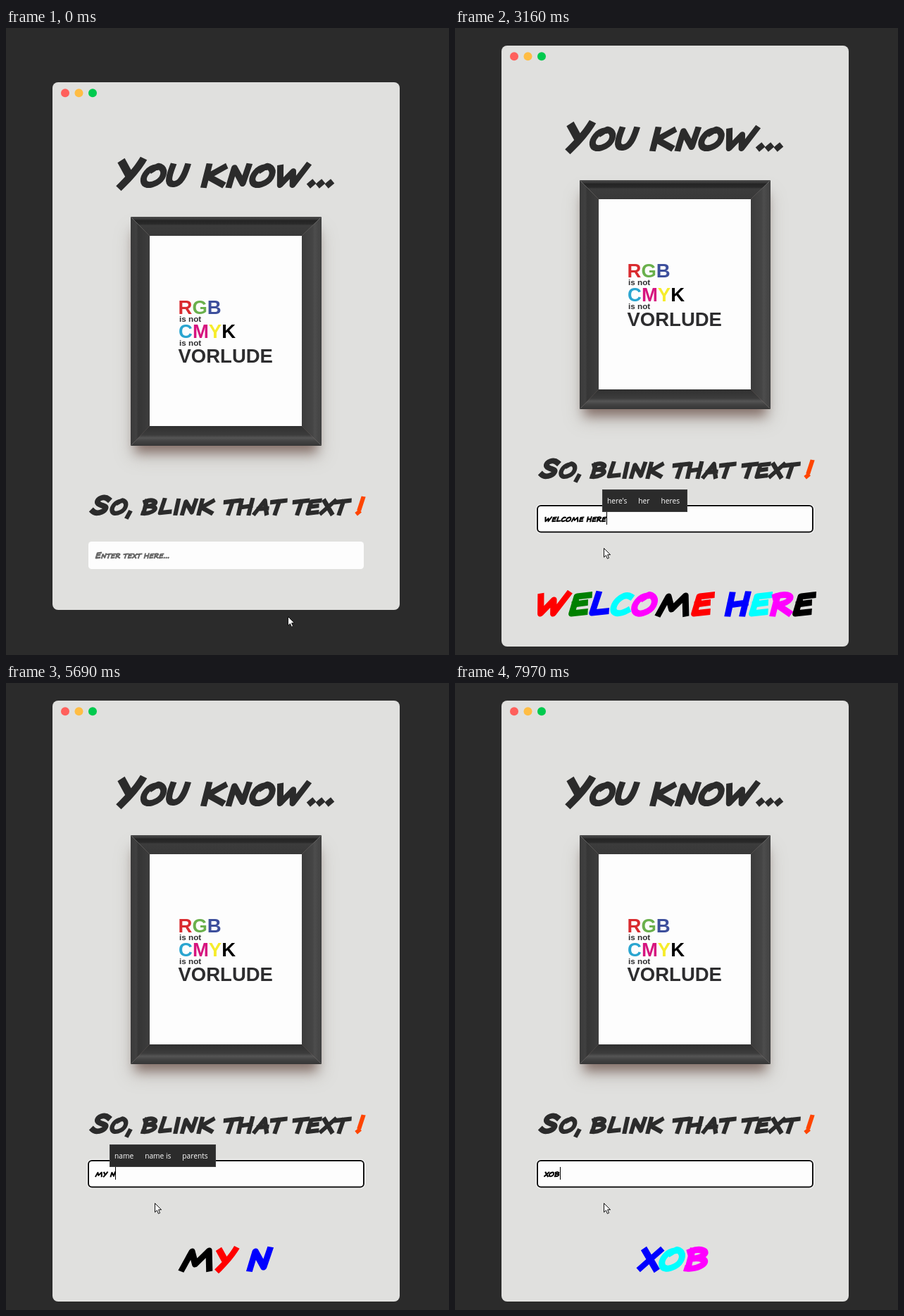
Write an HTML page that moves like this. It is 629 px wide and 890 px high and loops after 8 s.

```html
<!DOCTYPE html>
<html lang="en">
<head>
<meta charset="utf-8">
<title>Blink that text</title>
<style>
  html, body { margin: 0; width: 100%; height: 100%; overflow: hidden; background: #2b2b2b; }
  #stage { position: absolute; left: 0; top: 0; width: 629px; height: 890px; overflow: hidden; }
  svg { display: block; }
  .ink path { fill: none; stroke-width: 9; stroke-linecap: square; stroke-linejoin: round; }
  .poster { font: bold 27.5px "Liberation Sans", Arial, sans-serif; }
  .poster .small { font-size: 11.7px; fill: #2d2d2f; }
  #popup {
    position: absolute; top: 655px; height: 32px; box-sizing: border-box;
    display: none; align-items: center; gap: 16px; padding: 0 10px 0 6px;
    background: #2b2b2b; border: 1px solid #3d3d3d; color: #fff;
    font: 10.2px "Open Sans", "Noto Sans", sans-serif; white-space: nowrap;
  }
</style>
</head>
<body>
<div id="stage">
  <svg width="629" height="890" viewBox="0 0 629 890">
    <defs>
      <linearGradient id="top" x2="0" y2="1">
        <stop offset="0" stop-color="#4a4a4a"/><stop offset=".12" stop-color="#3a3a3a"/>
        <stop offset=".2" stop-color="#242424"/><stop offset=".38" stop-color="#2a2a2a"/>
        <stop offset=".45" stop-color="#3c3c3c"/><stop offset="1" stop-color="#383838"/>
      </linearGradient>
      <linearGradient id="left">
        <stop offset="0" stop-color="#3a3a3a"/><stop offset=".3" stop-color="#404040"/>
        <stop offset=".4" stop-color="#353535"/><stop offset="1" stop-color="#3d3d3d"/>
      </linearGradient>
      <linearGradient id="right">
        <stop offset="0" stop-color="#3c3c3c"/><stop offset=".55" stop-color="#454545"/>
        <stop offset=".65" stop-color="#4d4d4d"/><stop offset="1" stop-color="#404040"/>
      </linearGradient>
      <linearGradient id="bottom" x2="0" y2="1">
        <stop offset="0" stop-color="#303030"/><stop offset=".45" stop-color="#3c3c3c"/>
        <stop offset=".6" stop-color="#555"/><stop offset=".75" stop-color="#444"/>
        <stop offset="1" stop-color="#363636"/>
      </linearGradient>
    </defs>

    <g id="page">
      <rect id="window" x="66" y="25" width="493" height="749" rx="8" fill="#e0e0de"/>
      <circle cx="84" cy="40.3" r="6" fill="#ff605c"/>
      <circle cx="103.5" cy="40.3" r="6" fill="#ffbd44"/>
      <circle cx="123" cy="40.3" r="6" fill="#00ca4e"/>

      <rect x="177" y="234" width="271" height="324" fill="#6b5a50" opacity=".25" style="filter:blur(13px)"/>
      <rect x="184" y="236" width="257" height="314" fill="#6b5048" opacity=".7" style="filter:blur(8px)"/>
      <path fill="url(#top)" d="M177 216H448L420 243H204Z"/>
      <path fill="url(#left)" d="M177 216L204 243V513L177 541Z"/>
      <path fill="url(#right)" d="M448 216L420 243V513L448 541Z"/>
      <path fill="url(#bottom)" d="M177 541L204 513H420L448 541Z"/>
      <rect x="204" y="243" width="216" height="270" fill="#fdfdfd"/>

      <g class="poster">
        <text x="244.5" y="353.5"><tspan fill="#d92b2f">R</tspan><tspan fill="#6ab04c">G</tspan><tspan fill="#3d4f9c">B</tspan></text>
        <text class="small" x="246" y="365">is not</text>
        <text x="245" y="388"><tspan fill="#2aa5d0">C</tspan><tspan fill="#d6147f">M</tspan><tspan fill="#f6ec2c">Y</tspan><tspan>K</tspan></text>
        <text class="small" x="246" y="399">is not</text>
        <text x="244.5" y="423" fill="#2d2d2f">VORLUDE</text>
      </g>

      <g id="title" class="ink"></g>
      <g id="subtitle" class="ink"></g>

      <rect id="field" x="117" y="677" width="391" height="39" rx="4.5" fill="#fdfdfd"/>
      <g id="ring" fill="none">
        <rect x="117" y="678" width="391" height="37.5" rx="5" stroke="#fff" stroke-width="4"/>
        <rect x="117" y="678" width="391" height="37.5" rx="5" stroke="#101010" stroke-width="2"/>
      </g>
      <g id="typed" class="ink"></g>
      <rect id="caret" y="687" width="1" height="18"/>
    </g>

    <g id="output" class="ink"></g>
    <g id="mouse">
      <path id="arrow" fill="#fff" stroke="#111" d="M.5 .5V13.2L3.4 10.5L5.4 15.2L7.6 14.2L5.6 9.7H9.6Z"/>
      <path id="beam" fill="none" stroke="#111" d="M-3 -8.5H-1L0 -7.5L1 -8.5H3M0 -7.5V7.5M-3 8.5H-1L0 7.5L1 8.5H3"/>
    </g>
  </svg>
  <div id="popup"></div>
</div>

<script>
const LOOP = 8000;
const $ = id => document.getElementById(id);
const show = (id, on) => { $(id).style.display = on ? "" : "none"; };

// Marker letters: advance, then strokes standing on y = 28.
const straight = {
  a: [34, "M4 27L20 1L28 27M10 18L27 17"],
  e: [30, "M25 1L8 3L5 27L23 25M7 14L21 12"],
  h: [34, "M6 1L5 27M28 0L26 27M6 15L27 12"],
  i: [16, "M8 1L7 27"],
  k: [37, "M8 1L6 27M30 2L9 15L31 26"],
  l: [29, "M8 0L4 26L23 24"],
  m: [49, "M4 27L13 3L21 21L37 2L42 27"],
  n: [33, "M5 27L8 3L24 25L28 1"],
  t: [28, "M2 4L28 1M16 3L12 27"],
  w: [48, "M5 3L9 27L24 8L27 27L43 0"],
  x: [28, "M5 2L24 27M26 2L3 26"],
  y: [28, "M4 3L12 14M25 1C20 12 12 22 7 28"]
};
const round = {
  b: [36, "M8 2L6 27M5 3C18 -3 31 3 25 8S12 13 10 13C23 11 32 16 27 21S12 28 5 27"],
  c: [30, "M25 3C16 -2 5 8 4 18S14 29 24 23"],
  o: [36, "M18 2C8 3 2 14 4 21S14 29 23 24S33 8 27 3S20 1 14 5"],
  r: [32, "M7 3L5 27M4 3C16 -2 28 1 25 7S12 14 9 15L27 26"],
  s: [32, "M26 4C18 -2 7 3 9 9S26 14 24 20S10 29 4 24"],
  u: [32, "M6 1C2 20 4 27 13 26S25 14 27 1"],
  ",": [10, "M5 26L2 34"],
  ".": [13, "M5 26L6 25"],
  "!": [14, "M9 -3L6 17M4 26L5 25"],
  " ": [18, ""]
};
const glyphs = { ...straight, ...round };

const isCap = c => c !== c.toLowerCase();
const advance = c => glyphs[c.toLowerCase()][0] * (isCap(c) ? 1.25 : 1);
const measure = text => [...text].reduce((sum, c) => sum + advance(c), 0);

function write(id, text, x, base, scale, colour) {
  const g = $(id);
  let pen = 0;
  g.setAttribute("aria-label", text);
  g.setAttribute("transform", `translate(${x} ${base}) scale(${scale})`);
  g.innerHTML = [...text].map((c, i) => {
    const size = isCap(c) ? 1.25 : 1;
    const part = `<path d="${glyphs[c.toLowerCase()][1]}" stroke="${colour(c, i)}" ` +
      `transform="translate(${pen - 2.5} 0) scale(${size}) skewX(-10) translate(0 -28)"/>`;
    pen += advance(c);
    return part;
  }).join("");
}

// What the field holds from each time on.
const steps = [[0, ""]];
function type(text, from, times) {
  times.forEach((time, i) => steps.push([time, text.slice(0, from + i)]));
}
function erase(text, start, gap) {
  for (let n = text.length - 1, k = 1; n >= 0; n--, k++) steps.push([start + gap * k, text.slice(0, n)]);
}
type("welcome here", 2, [1390, 1550, 1700, 1780, 1860, 1930, 2080, 2230, 2400, 2550, 2850]);
steps.push([3870, "welcome her"]);
erase("welcome her", 4370, 33);
type("my name is", 1, [5060, 5210, 5370, 5690, 5770, 5850, 5950, 6090, 6230, 6340]);
steps.push([7190, "my name "], [7340, "my "], [7500, ""]);
type("xob", 1, [7730, 7880, 7970]);

const popups = [
  [2080, 2230, 187, "to back home"],
  [2230, 2550, 191, "here home her"],
  [2550, 2850, 202, "her here hero"],
  [2850, 3870, 209, "here's her heres"],
  [5520, 5690, 147, "name own life"],
  [5690, 5850, 147, "name name_is parents"],
  [5850, 6090, 160, "name name_is names"],
  [6090, 6660, 178, "is was and"]
];

const path = [[0, 401, 835], [70, 345, 800], [150, 252, 752], [220, 205, 724],
  [390, 207, 729], [540, 210, 736], [620, 211, 738]];
function mouseAt(t) {
  const i = path.findIndex(p => p[0] > t);
  if (i < 0) return path[path.length - 1].slice(1);
  const [a, b] = [path[i - 1], path[i]];
  const f = (t - a[0]) / (b[0] - a[0]);
  return [a[1] + (b[1] - a[1]) * f, a[2] + (b[2] - a[2]) * f];
}

const FOCUS = 620, BLINK = 530, SMALL = 13.33 / 60;
const palette = ["#f00", "#008000", "#00f", "#0ff", "#f0f", "#000"];
const dark = "#2b2b2b";
const last = {};
const changed = (key, value) => last[key] !== value && (last[key] = value, true);

function draw(t) {
  const [since, text] = steps.filter(s => s[0] <= t).pop();
  const empty = text === "";
  const focused = t >= FOCUS;

  if (changed("text", text)) {
    $("page").setAttribute("transform", `translate(0 ${empty ? 52 : 0})`);
    $("window").setAttribute("height", empty ? 749 : 853);
    write("typed", text || "Enter text here...", 127, 700.5, SMALL, () => empty ? "#666" : "#000");
    $("caret").setAttribute("x", Math.round(127 + measure(text) * SMALL) - (empty ? 1 : 0));
  }

  const shift = Math.max(0, Math.floor((t - 1265) / 150));
  if (changed("output", text + shift)) {
    const left = 313 - measure(text.trimEnd()) / 2;
    write("output", text, left, 832, 1, (c, i) => palette[(i + shift) % palette.length]);
  }

  show("ring", focused);
  const idle = t - Math.max(since, FOCUS);
  show("caret", focused && idle % (2 * BLINK) < BLINK);

  const [x, y] = mouseAt(t);
  const overField = empty && t >= 200;
  $("mouse").setAttribute("transform", `translate(${Math.round(x)} ${Math.round(y)})`);
  show("arrow", !overField);
  show("beam", overField);

  const hint = popups.find(p => t >= p[0] && t < p[1]);
  if (changed("hint", hint || null)) {
    $("popup").style.display = hint ? "flex" : "none";
    if (hint) {
      $("popup").style.left = hint[2] + "px";
      $("popup").innerHTML = hint[3].split(" ").map(w => `<span>${w.replace("_", " ")}</span>`).join("");
    }
  }
}

write("title", "You know...", 158, 171.5, 0.99, () => dark);
write("subtitle", "So, blink that text !", 121, 637.5, 0.69, c => c === "!" ? "#ff4500" : dark);

const start = performance.now();
function tick() {
  draw((performance.now() - start) % LOOP);
  requestAnimationFrame(tick);
}
draw(0);
requestAnimationFrame(tick);
</script>
</body>
</html>
```
